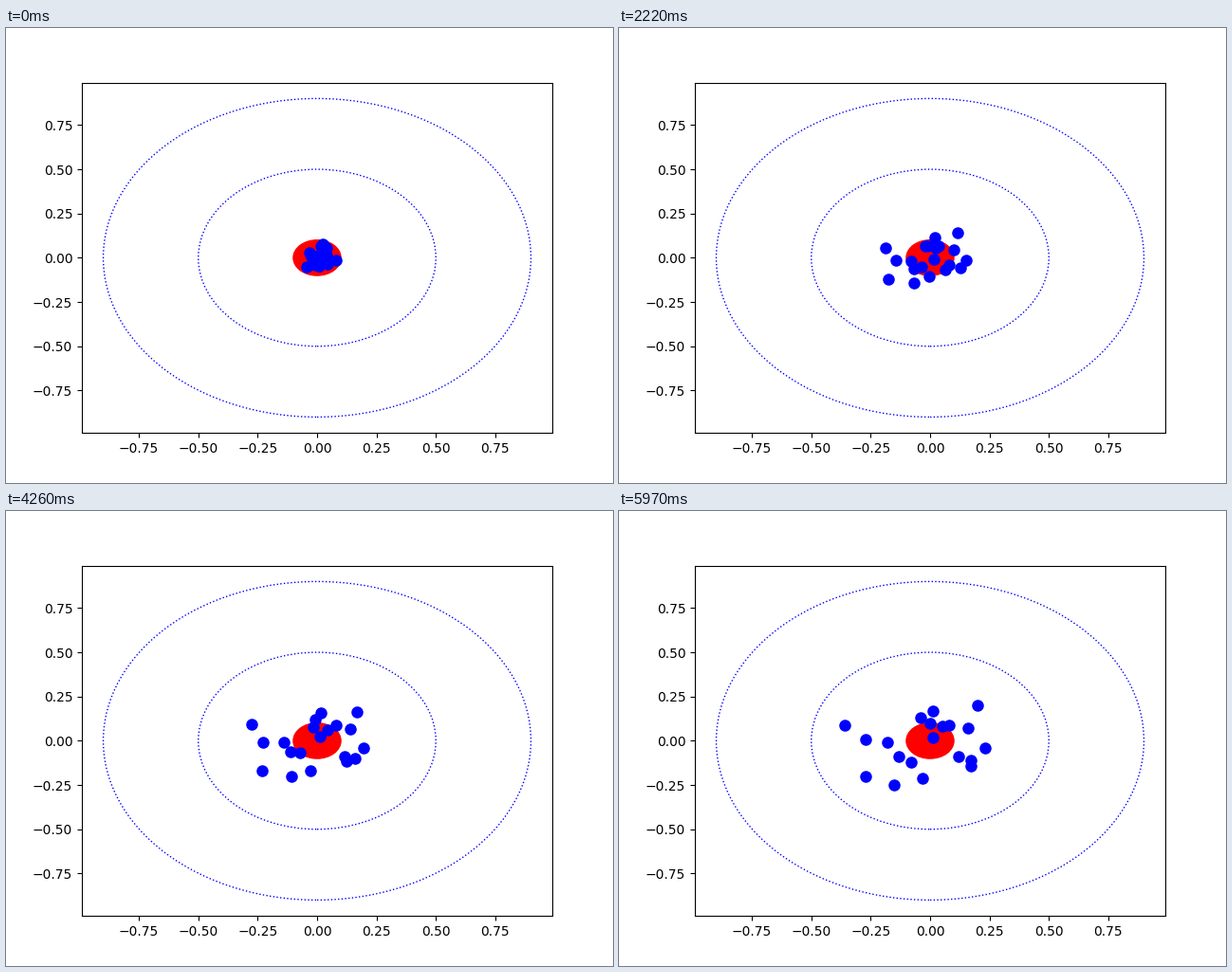
Recreate the animation shown at these times as a matplotlib script. Size 640 by 480 pixels, loop 6 s.

```python
import numpy as np
import matplotlib.pyplot as plt
from matplotlib.animation import FuncAnimation
from matplotlib.patches import Circle

FRAMES, INTERVAL = 200, 30
LIMIT = 0.99
STEP, DAMPING = 0.006, 0.9

# Where each particle has wandered by the end of the loop.
ENDS = np.array([
    (-0.36, 0.09), (-0.27, 0.01), (-0.27, -0.20), (-0.18, -0.01), (-0.15, -0.25),
    (-0.13, -0.09), (-0.08, -0.12), (-0.04, 0.13), (-0.03, -0.21), (0.00, 0.10),
    (0.01, 0.17), (0.01, 0.02), (0.05, 0.08), (0.08, 0.09), (0.12, -0.09),
    (0.16, 0.07), (0.17, -0.11), (0.17, -0.14), (0.20, 0.20), (0.23, -0.04)])


def jitter(rng):
    """Damped random walk for all particles, frame by frame."""
    offset = np.zeros_like(ENDS)
    steps = []
    for _ in range(FRAMES):
        steps.append(offset)
        offset = DAMPING * offset + rng.normal(0, STEP, ENDS.shape)
    return np.array(steps)


def diffuse(rng):
    """Paths that spread from a clump at the centre out to ENDS."""
    starts = 0.2 * ENDS + rng.uniform(-0.05, 0.05, ENDS.shape)
    t = np.linspace(0, 1, FRAMES)[:, None, None]
    drift = starts + (ENDS - starts) * t ** 0.7
    return drift + jitter(rng) * np.sqrt(4 * t * (1 - t))


paths = diffuse(np.random.default_rng(4))

fig, ax = plt.subplots(figsize=(6.4, 4.8), dpi=100)
ax.add_patch(Circle((0, 0), 0.1, color="red"))
for radius in (0.5, 0.9):
    ax.add_patch(Circle((0, 0), radius, fill=False, color="blue", linestyle=":"))
ax.set_xlim(-LIMIT, LIMIT)
ax.set_ylim(-LIMIT, LIMIT)
dots, = ax.plot([], [], "o", color="blue", markersize=8)


def update(i):
    dots.set_data(*paths[i].T)
    return dots,


anim = FuncAnimation(fig, update, frames=FRAMES, interval=INTERVAL,
                     repeat=True, repeat_delay=0)
plt.show()
```
